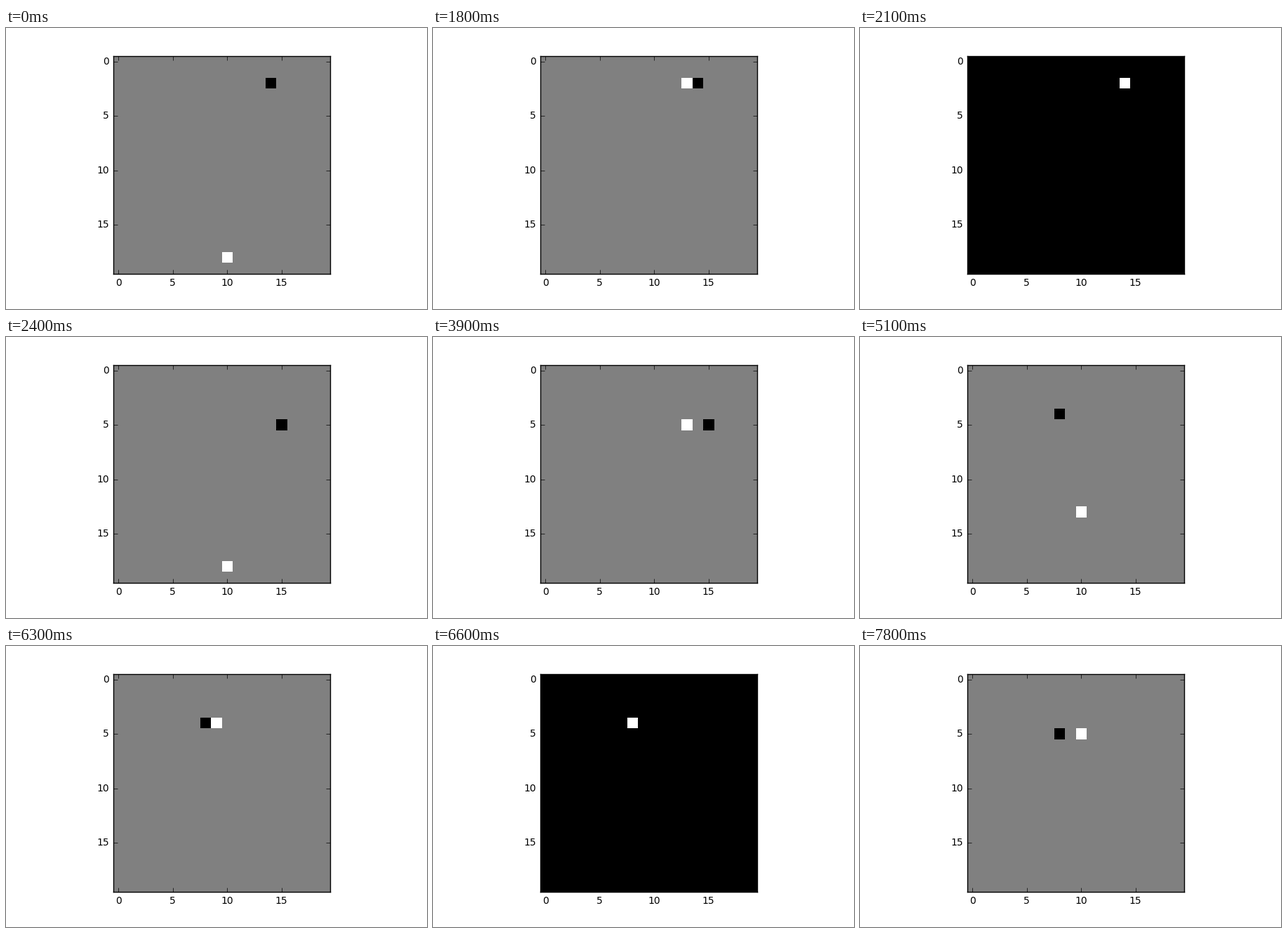
Animation, 600 px wide and 400 px high, one loop 8000 ms. Source, as a matplotlib script:

```python
import numpy as np
import matplotlib.pyplot as plt
from matplotlib.animation import FuncAnimation

plt.rcParams.update({
    "font.family": "DejaVu Sans",
    "font.size": 10,
    "axes.linewidth": 1.0,
    "ytick.alignment": "center",
})

SIZE = 20
START = (10, 18)
TARGETS = [(14, 2), (15, 5), (8, 4), (8, 5)]
FRAME_MS = 100
FRAMES = 80
FRAMES_PER_MOVE = 3


def walk(target):
    """Climb to the target's row in strides of 5, 3 or 1, then go sideways."""
    x, y = START
    yield x, y
    while y > target[1]:
        y -= next(stride for stride in (5, 3, 1) if stride <= y - target[1])
        yield x, y
    while x != target[0]:
        gap = target[0] - x
        x += int(np.sign(gap)) * (2 if abs(gap) > 3 else 1)
        yield x, y


def board(agent, target):
    cells = np.zeros((SIZE, SIZE))
    cells[target[::-1]] = -1
    cells[agent[::-1]] = 1
    return cells


boards = [board(agent, target) for target in TARGETS for agent in walk(target)]

fig = plt.figure(figsize=(6, 4), dpi=100, facecolor="white")
ax = fig.add_axes([152.5 / 600, 50 / 400, 310 / 600, 310 / 400])
image = ax.imshow(boards[0], cmap="gray", interpolation="nearest")
ax.set_xticks(range(0, SIZE, 5))
ax.set_yticks(range(0, SIZE, 5))
ax.tick_params(direction="in", length=4, width=0.5, pad=4, top=True, right=True)


def update(frame):
    cells = boards[frame // FRAMES_PER_MOVE]
    image.set_data(cells)
    # Each board is scaled to its own range, so a reached target turns it black.
    image.set_clim(cells.min(), cells.max())
    return [image]


anim = FuncAnimation(fig, update, frames=FRAMES, interval=FRAME_MS,
                     repeat=True, repeat_delay=0, blit=False)
plt.show()
```
